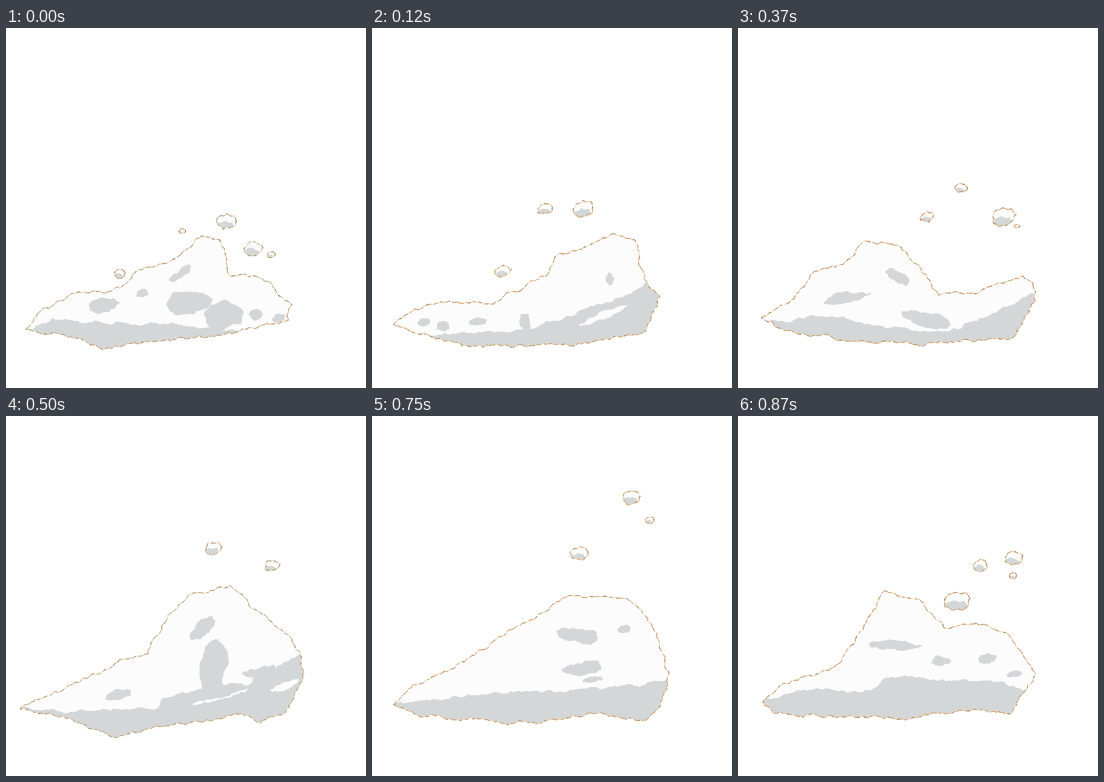
Recreate the animation shown at these times as an HTML page. Size 360 by 360 pixels, loop 1 s.

```html
<!DOCTYPE html>
<html lang="en">
<head>
<meta charset="utf-8">
<title>Dust cloud</title>
<style>
html, body { margin: 0; width: 100%; height: 100%; overflow: hidden; background: #fff; }
svg { display: block; width: 100vw; height: 100vh; }
</style>
</head>
<body>
<svg id="stage" viewBox="0 0 360 360"></svg>
<script>
const NS = 'http://www.w3.org/2000/svg';
const WHITE = '#fcfcfc', GREY = '#d3d7d8';
const TAN = '#c4a276', ORANGE = '#d8985a';
const stage = document.getElementById('stage');

let seed = 1, clips = 0;
const rand = () => {
  seed = (seed * 16807) % 2147483647;
  return seed / 2147483647;
};
const jitter = amp => amp * (rand() * 2 - 1);

const add = (parent, tag, attrs) => {
  const el = document.createElementNS(NS, tag);
  for (const k in attrs) el.setAttribute(k, attrs[k]);
  return parent.appendChild(el);
};
const toPath = p => 'M' + p.map(q => q[0].toFixed(1) + ' ' + q[1].toFixed(1)).join('L') + 'Z';

// Midpoint displacement turns a straight run into a ragged one
function crumple(a, b, out) {
  const dx = b[0] - a[0], dy = b[1] - a[1], len = Math.hypot(dx, dy);
  if (len < 2.6) return out.push(a);
  const o = jitter(Math.min(len * 0.18, 1.9)) / len;
  const mid = [(a[0] + b[0]) / 2 - dy * o, (a[1] + b[1]) / 2 + dx * o];
  crumple(a, mid, out);
  crumple(mid, b, out);
}
function ragged(keys) {
  const out = [];
  keys.forEach((p, i) => crumple(p, keys[(i + 1) % keys.length], out));
  return toPath(out);
}
function blob(x, y, rx, ry, tilt = -0.2) {
  const n = 9, keys = [];
  for (let i = 0; i < n; i++) {
    const t = i / n * 2 * Math.PI, r = 1 + jitter(0.18);
    const u = rx * r * Math.cos(t), v = ry * r * Math.sin(t);
    keys.push([x + u * Math.cos(tilt) - v * Math.sin(tilt), y + u * Math.sin(tilt) + v * Math.cos(tilt)]);
  }
  return ragged(keys);
}

// White mass with an outline of varying colour; returns the clipped group for its shading
function mass(g, d, tone) {
  const id = 'clip' + clips++;
  add(add(g, 'clipPath', { id }), 'path', { d });
  add(g, 'path', { d, fill: WHITE });
  const inner = add(g, 'g', { 'clip-path': `url(#${id})` });
  const line = (stroke, on, off) => add(g, 'path', {
    d, fill: 'none', stroke, 'stroke-width': 0.9,
    'stroke-dasharray': Array.from({ length: 10 }, (_, i) => (0.5 + rand()) * (i % 2 ? off : on)).join(' ')
  });
  line('#e6d2b8', 9, 1);
  line(tone, 4, 3);
  line('#94897a', 1.5, 9);
  return inner;
}

function draw(pose, i) {
  seed = 7919 * (i + 1);
  const g = add(stage, 'g', { visibility: 'hidden' });
  const fill = (to, d, color) => add(to, 'path', { d, fill: color });
  const inner = mass(g, ragged(pose.body), pose.tone);
  fill(inner, ragged([...pose.shade, [320, 340], [0, 340]]), GREY);
  pose.spots.forEach(s => fill(inner, blob(...s), GREY));
  pose.lights.forEach(s => fill(inner, blob(...s), WHITE));
  for (const [x, y, w] of pose.puffs) {
    const d = blob(x, y, w / 2, w * 0.36);
    fill(mass(g, d, pose.tone), d, GREY).setAttribute('transform', `translate(-2 ${w * 0.34})`);
  }
  return g;
}

// Body: left tip, along the top to the right, back along the base
const low = {
  tone: TAN,
  body: [[20, 302], [38, 280], [72, 264], [115, 260], [138, 240], [165, 233], [195, 208], [214, 212],
    [224, 248], [250, 248], [286, 277], [282, 293], [232, 304], [155, 313], [95, 321], [68, 310]],
  shade: [[20, 304], [46, 290], [100, 296], [180, 298], [232, 303], [250, 325]],
  spots: [[98, 277, 14, 8], [136, 265, 6, 5], [174, 246, 14, 4, -0.6], [182, 276, 24, 13],
    [216, 288, 20, 15], [250, 287, 7, 6], [273, 290, 7, 4]],
  lights: [],
  puffs: [[221, 194, 20], [248, 221, 18], [265, 227, 8], [176, 203, 7], [114, 246, 11]]
};
const right = {
  tone: ORANGE,
  body: [[22, 297], [42, 281], [78, 273], [115, 276], [150, 262], [176, 246], [186, 226], [214, 219],
    [240, 206], [263, 212], [272, 251], [288, 268], [271, 305], [205, 316], [150, 317], [90, 318]],
  shade: [[22, 304], [80, 306], [140, 304], [200, 288], [262, 263], [284, 248]],
  spots: [[52, 294, 6, 4], [71, 298, 7, 6], [106, 294, 9, 4], [153, 294, 6, 9], [238, 251, 4, 6]],
  lights: [[230, 288, 30, 4, -0.4]],
  puffs: [[211, 181, 22], [131, 243, 15], [173, 181, 15]]
};
const left = {
  tone: ORANGE,
  body: [[23, 290], [52, 274], [78, 243], [108, 234], [128, 213], [160, 217], [178, 236], [200, 267],
    [240, 265], [285, 248], [295, 256], [297, 272], [276, 309], [180, 317], [110, 313], [45, 302]],
  shade: [[23, 293], [110, 291], [180, 303], [222, 301], [265, 279], [299, 266]],
  spots: [[108, 270, 24, 5], [160, 249, 14, 6, 0.5], [190, 292, 28, 8, 0.2]],
  lights: [],
  puffs: [[223, 160, 12], [189, 189, 13], [265, 189, 25], [279, 198, 5]]
};
const high = {
  tone: TAN,
  body: [[14, 293], [60, 272], [112, 246], [142, 238], [160, 205], [184, 178], [224, 169], [250, 194],
    [276, 214], [294, 236], [298, 256], [280, 296], [255, 307], [232, 298], [106, 321], [58, 301]],
  shade: [[14, 291], [66, 296], [190, 289], [240, 276], [247, 262], [296, 234]],
  spots: [[207, 250, 14, 26, 0.1], [198, 212, 16, 8, -0.6], [200, 278, 46, 7], [255, 256, 18, 6], [112, 279, 15, 5]],
  lights: [[278, 270, 16, 4, -0.4]],
  puffs: [[207, 132, 16], [266, 150, 15]]
};
const tall = {
  tone: ORANGE,
  body: [[18, 291], [40, 268], [72, 248], [108, 239], [130, 244], [184, 225], [208, 177], [246, 149],
    [279, 163], [292, 206], [296, 258], [294, 302], [272, 312], [225, 301], [110, 312], [50, 299]],
  shade: [[18, 290], [78, 294], [120, 279], [214, 290], [285, 273], [299, 248]],
  spots: [[254, 209, 17, 9, 0.2], [219, 259, 30, 8], [256, 183, 4, 3], [165, 269, 14, 3]],
  lights: [[142, 291, 3, 12]],
  puffs: [[255, 99, 22], [275, 121, 10], [198, 152, 21]]
};
const broad = {
  tone: ORANGE,
  body: [[25, 287], [42, 269], [98, 249], [116, 228], [135, 194], [146, 175], [182, 184], [206, 212],
    [238, 207], [270, 218], [298, 258], [281, 281], [274, 297], [222, 294], [174, 302], [34, 297]],
  shade: [[25, 284], [60, 274], [130, 274], [150, 262], [262, 265], [299, 276]],
  spots: [[156, 230, 25, 5, 0], [203, 245, 10, 5, 0], [249, 243, 9, 5], [277, 258, 8, 3]],
  lights: [],
  puffs: [[242, 149, 15], [275, 142, 19], [219, 185, 24], [275, 160, 8]]
};

// Halfway between two lists of number rows
const halfway = (a, b) => a.slice(0, b.length).map((row, i) =>
  row.slice(0, b[i].length).map((v, k) => (v + b[i][k]) / 2));
const between = (a, b, puffs) => ({
  tone: ORANGE,
  body: halfway(a.body, b.body),
  shade: halfway(a.shade, b.shade),
  spots: halfway(a.spots, b.spots),
  lights: [], puffs
});
const turning = between(right, left, [[217, 170, 17], [160, 216, 14], [264, 206, 22]]);
const settling = between(tall, broad, [[259, 82, 18], [278, 104, 9], [208, 137, 19]]);

const starts = [0, 120, 250, 370, 500, 620, 750, 870];
const views = [low, right, turning, left, high, tall, settling, broad].map(draw);

function render(ms) {
  const t = ms % 1000;
  const now = starts.filter(s => s <= t).length - 1;
  views.forEach((g, k) => g.setAttribute('visibility', k === now ? 'visible' : 'hidden'));
}

const begin = performance.now();
function tick() {
  render(performance.now() - begin);
  requestAnimationFrame(tick);
}
tick();
</script>
</body>
</html>
```
